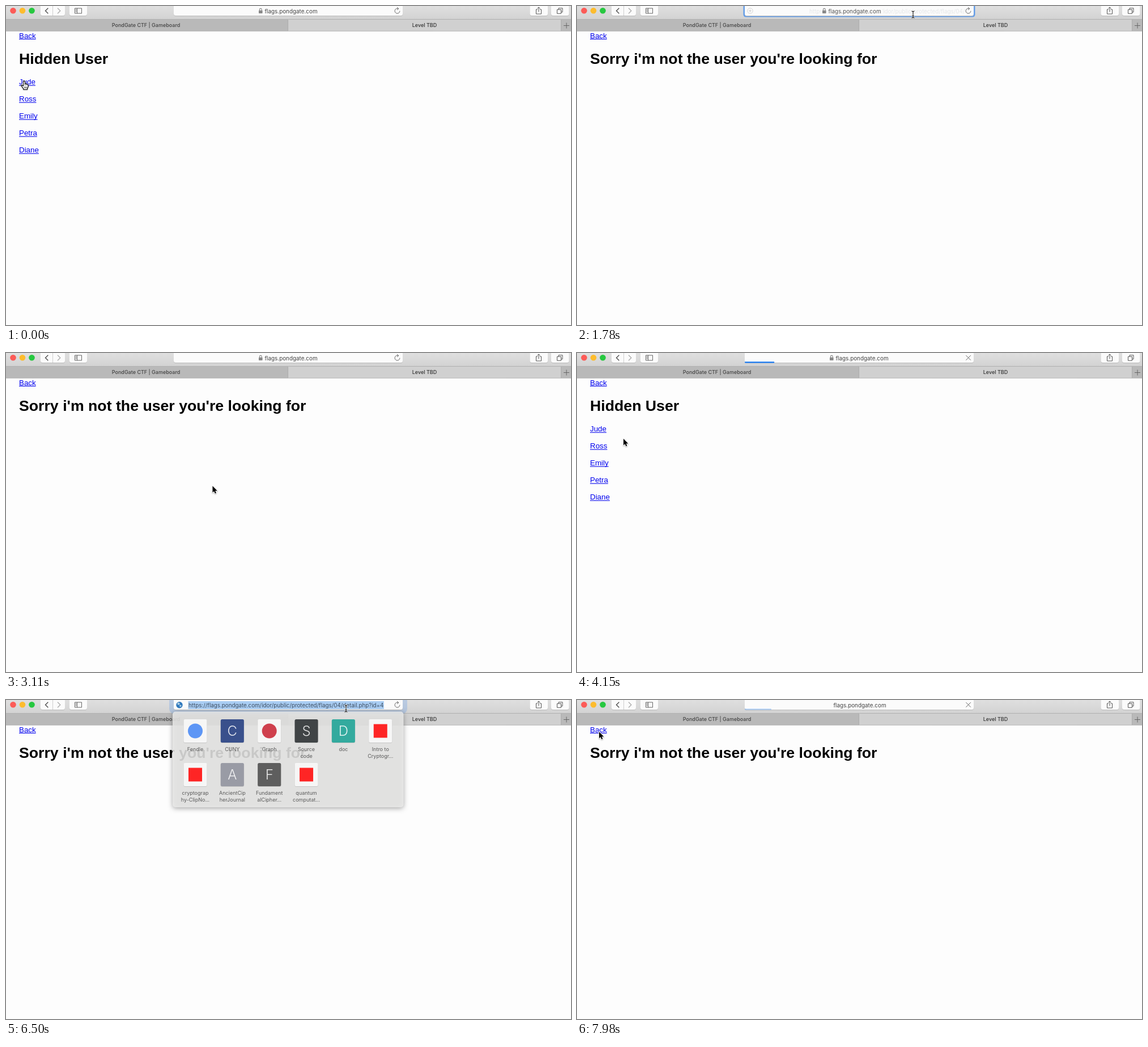
An HTML page with a canvas that plays this animation: 997x562 px, repeating every 8 s.

```html
<!DOCTYPE html>
<html lang="en">
<head>
<meta charset="utf-8">
<title>Hidden User</title>
<style>
html, body { margin: 0; width: 100%; height: 100%; overflow: hidden; background: #fdfdfd; }
canvas { display: block; }
</style>
</head>
<body>
<canvas id="stage" width="997" height="562"></canvas>
<script>
const c = document.getElementById('stage').getContext('2d');
const LOOP = 8000, STEP = 147.7;
const UI = 'Inter, sans-serif', PAGE = '"Liberation Sans", Arial, sans-serif';
const SITE = 'flags.pondgate.com';
const URL_PATH = `https://${SITE}/idor/public/protected/flags/04/detail.php?id=`;
const USERS = ['Jude', 'Ross', 'Emily', 'Petra', 'Diane'];

// [step, x, y, shape]; positions between keys are interpolated
const CURSOR = [
  [0, 32, 132, 'hand'], [3, 32, 132, 'hand'], [4, 70, 122, 'arrow'], [7, 560, 24, 'arrow'],
  [8, 588, 16, 'arrow'], [9, 593, 15, 'beam'], [14, 593, 15, 'beam'], [15, 590, 50, 'arrow'],
  [18, 466, 289, 'arrow'], [20, 466, 289, 'arrow'], [24, 60, 70, 'arrow'], [25, 46, 52, 'hand'],
  [27, 58, 88, 'arrow'], [28, 82, 151, 'arrow'], [30, 70, 205, 'arrow'],
  [31, 38, 221, 'hand'], [35, 38, 221, 'hand'], [36, 80, 205, 'arrow'], [39, 530, 40, 'arrow'],
  [40, 586, 16, 'arrow'], [41, 597, 15, 'beam'], [42, 600, 15, 'beam'], [45, 600, 15, 'beam'],
  [46, 520, 90, 'arrow'], [48, 250, 246, 'arrow'], [49, 183, 215, 'arrow'], [52, 45, 62, 'arrow'],
  [53, 39, 56, 'arrow']
];
const LOADS = [1, 25, 34, 53];
const FOCUS = [{ from: 11, to: 20, id: 1 }, { from: 42, to: 48, id: 4 }];

const TILES = [
  ['#fff', '', 'Fendle', '', '#4285f4', 'dot'],
  ['#223c83', 'C', 'CUNY', ''],
  ['#fff', '', 'Graph', '', '#c8202f', 'dot'],
  ['#2a2e31', 'S', 'Source', 'code'],
  ['#1ba698', 'D', 'doc', ''],
  ['#fff', '', 'Intro to', 'Cryptogr...', '#f00', 'square'],
  ['#fff', '', 'cryptograp', 'hy-ClipNo...', '#f00', 'square'],
  ['#9294a0', 'A', 'AncientCip', 'herJournal'],
  ['#4d4d4d', 'F', 'Fundament', 'alCipher...'],
  ['#fff', '', 'quantum', 'computat...', '#f00', 'square']
];

const ARROW = new Path2D('M0 0V11.6L2.7 9.2L4.4 13.2L6.4 12.4L4.7 8.4H8.3Z');
const HAND = new Path2D('M-1.4 1Q0-.8 1.4 1V5L2.6 4.6 3.8 5.4 5.1 5.5 6 6.6 7 7.3V10.4L5.6 13V15H-1L-1.6 13-5.2 8.2Q-4.6 6.6-3 7.7L-1.4 9Z');

function box(x, y, w, h, r, fill) {
  c.beginPath();
  c.roundRect(x, y, w, h, r);
  c.fillStyle = fill;
  c.fill();
}
function disc(x, y, r, fill) {
  c.beginPath();
  c.arc(x, y, r, 0, 7);
  c.fillStyle = fill;
  c.fill();
}
function line(d, color, width = 1) {
  c.strokeStyle = color;
  c.lineWidth = width;
  c.stroke(new Path2D(d));
}
function text(s, x, y, font, color, align = 'left') {
  c.font = font;
  c.fillStyle = color;
  c.textAlign = align;
  c.fillText(s, x, y);
}
function faded(alpha, paint) {
  c.save();
  c.globalAlpha *= alpha;
  paint();
  c.restore();
}
function button(x, w) {
  box(x, -6, w, 24, 3.5, '#b9b9b9');
  box(x, -6, w, 23, 3.5, '#fbfbfb');
}
function link(s, y) {
  const font = '13.35px ' + PAGE;
  text(s, 23, y, font, '#0000ee');
  c.fillRect(23, y + 1.2, c.measureText(s).width, 1.1);
}

function page(hidden) {
  c.fillStyle = '#fdfdfd';
  c.fillRect(0, 0, 997, 562);
  link('Back', 56.6);
  text(hidden ? 'Hidden User' : "Sorry i'm not the user you're looking for", 23, 102, 'bold 26.7px ' + PAGE, '#000');
  if (hidden) USERS.forEach((name, i) => link(name, 138.2 + 30 * i));
}

function chrome(shareDim, tabHover) {
  const bar = c.createLinearGradient(0, 0, 0, 24);
  bar.addColorStop(0, '#dfdfdf');
  bar.addColorStop(1, '#d2d2d2');
  c.fillStyle = bar;
  c.fillRect(0, 0, 997, 24);
  box(0, 24, 997, 20, 0, '#b9b9b9');
  box(498, 24, 481, 20, 0, '#d0d0d0');
  line('M0 23.5H997M0 44.3H997M497.5 24V44M979.5 24V44', '#a9a9a9', .8);
  line('M984 34.5H994M989 29.5V39.5', '#666', 1);
  text('PondGate CTF | Gameboard', 247, 37.3, '500 9px ' + UI, '#444', 'center');
  text('Level TBD', 738.5, 37.3, '500 9px ' + UI, '#333', 'center');
  if (tabHover) line('M505 31.5l5.5 5.5m0-5.5l-5.5 5.5', '#aaa', .9);

  ['#fc5b57', '#fdbc2e', '#27c840'].forEach((color, i) => disc(12.5 + 16.5 * i, 8.3, 5.3, color));
  button(61, 43);
  button(112, 31);
  button(924.5, 31.5);
  button(962, 31.5);
  line('M82.5 0V17', '#d0d0d0');
  line('M74.3 3.8L69.5 8.5L74.3 13.2', '#444', 1.3);
  line('M91 3.8L95.8 8.5L91 13.2', '#aaa', 1.3);
  line('M121.5 4H133.5V13H121.5ZM125.5 4V13M122.8 6H124.5M122.8 8H124.5M122.8 10H124.5', '#555', .9);
  faded(shareDim ? .4 : 1, () =>
    line('M938 6H935.5V14H944.5V6H942M940 10.5V2M937.6 4.3L940 2L942.4 4.3', '#555', 1));
  line('M972.5 6.3H979.5V13.3H972.5ZM975 6V3.8H982V10.8H979.7', '#555', 1);
}

function lock(x) {
  box(x, 7.8, 6.6, 5.2, .8, '#888');
  line(`M${x + 1.4} 8V6.3a1.9 1.9 0 0 1 3.8 0V8`, '#888', 1.1);
}
function reload() {
  line('M694.9 8.7a4.4 4.4 0 1 1-2.6-4M692.8 4.8L690.2 2.2M692.8 4.8L690 6.9', '#666', 1);
}

function ring(spread, alpha) {
  faded(alpha, () => box(294 - spread, -8, 408 + 2 * spread, 27 + spread, 4 + spread, '#649de8'));
}

function address(n, load, focus) {
  const stage = focus ? n - focus.from : -1;
  if (stage === 0) ring(4, .25);
  if (stage === 1) ring(.5, 1);
  if (stage === 2) ring(6, .3);
  if (stage > 2) ring(.3, .9);
  button(296, 404);

  if (stage < 1) {
    const starting = load >= 0 && load < 2;
    text(SITE, starting ? 499 : 503, 12.6, '9.9px ' + UI, '#444', 'center');
    if (!starting) lock(446);
    if (load < 0) reload();
    else {
      line('M686.4 4.2l8.4 8.4m0-8.4l-8.4 8.4', '#666', 1);
      faded(starting ? .3 : 1, () =>
        box(296, 15.3, starting ? 47 : 50.5 + load * .6, 2.2, 1, '#1a7bf2'));
    }
    return;
  }

  reload();
  const url = URL_PATH + focus.id;
  if (stage === 1) {
    faded(.12, () => text(url.slice(0, -15), 410, 12.6, '9.9px ' + UI, '#456'));
    box(430, 2, 109, 13, 0, '#fbfbfb');
    lock(433);
    text(SITE, 490, 12.6, '9.9px ' + UI, '#555', 'center');
    line('M303 8.5H308M305.5 6V11', '#ccc', .9);
    c.beginPath();
    c.arc(305.5, 8.5, 4.7, 0, 7);
    c.stroke();
    return;
  }
  const x = stage === 2 ? 322 : 315.5;
  c.font = '9.8px ' + UI;
  box(x - .5, 2, c.measureText(url).width + 1, 14, 0, '#a9cdf3');
  text(url, x, 12.5, '9.8px ' + UI, '#3d4d60');
  disc(306, 8.7, 5.7, '#2f78bd');
  faded(.75, () => {
    disc(304.5, 6.6, 2.2, '#d5e8f2');
    disc(307.8, 10.3, 1.7, '#d5e8f2');
  });
}

function tile([fill, letter, top, bottom, tint, shape], i) {
  const x = 334 + 65.35 * (i % 6), y = i < 6 ? 34 : 111;
  box(x - 20.8, y + .6, 41.6, 41.4, 3, 'rgba(0,0,0,.14)');
  box(x - 20.5, y, 41, 41, 2.5, fill);
  if (shape === 'dot') disc(x, y + 20.5, 13, tint);
  if (shape === 'square') box(x - 12, y + 8.5, 24, 24, 0, tint);
  text(letter, x, y + 29.3, '300 24px ' + UI, '#fff', 'center');
  text(top, x, y + 56, '9px ' + UI, '#444', 'center');
  text(bottom, x, y + 67.8, '9px ' + UI, '#444', 'center');
}

function popup(alpha) {
  if (!alpha) return;
  faded(alpha, () => {
    c.save();
    c.shadowColor = 'rgba(0,0,0,.4)';
    c.shadowBlur = 9;
    c.shadowOffsetY = 2;
    box(294, 20.5, 407.5, 168.5, 5, '#ecebea');
    c.restore();
    TILES.forEach(tile);
  });
}

function cursor(n) {
  const i = CURSOR.findLastIndex(key => key[0] <= n);
  const [at, x0, y0, shape] = CURSOR[i], [end, x1, y1] = CURSOR[i + 1] || CURSOR[i];
  const k = end > at ? (n - at) / (end - at) : 0;
  c.save();
  c.translate(x0 + (x1 - x0) * k, y0 + (y1 - y0) * k);
  c.lineJoin = 'round';
  if (shape === 'beam') {
    const d = 'M-2.6-6Q0-6 0-4.2Q0-6 2.6-6M0-4.5V4.8M-2.6 6Q0 6 0 4.2Q0 6 2.6 6M-1.5 2.5H1.5';
    line(d, '#fff', 2.6);
    line(d, '#111', 1.1);
  } else {
    const hand = shape === 'hand', path = hand ? HAND : ARROW;
    c.shadowColor = 'rgba(0,0,0,.3)';
    c.shadowBlur = 2;
    c.shadowOffsetY = 1;
    c.strokeStyle = hand ? '#111' : '#fff';
    c.lineWidth = hand ? 1.1 : 1.8;
    c.stroke(path);
    c.shadowColor = 'transparent';
    c.fillStyle = hand ? '#fff' : '#000';
    c.fill(path);
    if (hand) {
      c.stroke(path);
      line('M1.4 5V8M3.8 5.4V8.2M.6 10V13M2.4 10V13M4.2 10V13', '#111', .7);
    }
  }
  c.restore();
}

function draw(now) {
  const n = Math.floor((now % LOOP) / STEP + .01);
  const start = LOADS.findLast(s => n >= s && n < s + 7);
  const load = start === undefined ? -1 : n - start;
  const focus = FOCUS.find(f => n >= f.from && n < f.to);
  const closing = FOCUS.some(f => f.to === n);
  const stage = focus ? n - focus.from : 0;

  page(n < 3 || (n >= 27 && n < 36));
  chrome(load === 2, n === 8 || n === 40);
  address(n, load, focus);
  popup(closing ? .4 : stage > 2 ? 1 : stage === 2 ? .85 : 0);
  cursor(n);
  requestAnimationFrame(draw);
}
requestAnimationFrame(draw);
</script>
</body>
</html>
```
